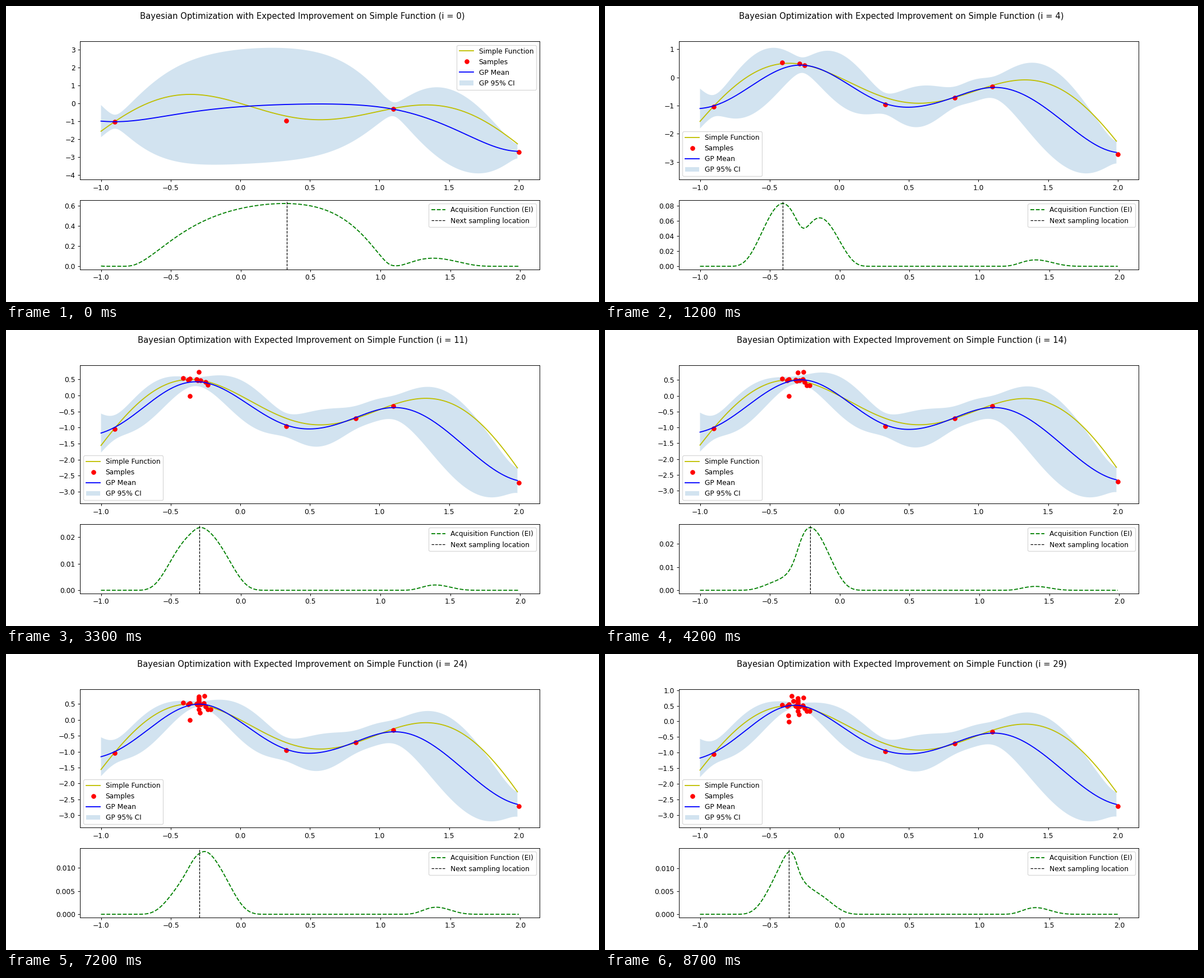
Write a matplotlib script that moves like this. It is 1058 px wide and 529 px high and loops after 9 s.

```python
import math

import matplotlib.pyplot as plt
import numpy as np
from matplotlib.animation import FuncAnimation

NOISE_VAR = 0.2 ** 2
XI = 0.01
STEPS = 30
START = 3  # samples known before the first step

GRID = np.arange(-1, 2, 0.01)

# Noisy samples (x, y) in the order they are taken
SAMPLES = np.array([
    (-0.9, -1.04), (1.1, -0.325), (2.0, -2.72),
    (0.33, -0.96), (0.83, -0.715), (-0.249, 0.425), (-0.284, 0.48),
    (-0.409, 0.535), (-0.373, 0.485), (-0.363, 0.52), (-0.363, -0.01),
    (-0.235, 0.335), (-0.314, 0.50), (-0.305, 0.475), (-0.298, 0.74),
    (-0.262, 0.515), (-0.258, 0.757), (-0.213, 0.325),
    (-0.290, 0.225), (-0.298, 0.335), (-0.302, 0.48), (-0.300, 0.50),
    (-0.297, 0.675), (-0.297, 0.645), (-0.298, 0.60), (-0.297, 0.56),
    (-0.296, 0.50), (-0.297, 0.48), (-0.308, 0.50), (-0.329, 0.65),
    (-0.341, 0.82), (-0.362, 0.55), (-0.366, 0.185),
])


def simple_function(x):
    return -np.sin(3 * x) - x ** 2 + 0.7 * x


def matern(a, b, length):
    r = math.sqrt(5) * np.abs(a[:, None] - b[None, :]) / length
    return (1 + r + r ** 2 / 3) * np.exp(-r)


def fit_kernel(x, y):
    """Length scale and signal variance of greatest marginal likelihood."""
    center = np.array([-0.3, 0.8])
    for width in (1.5, 0.25, 0.04, 0.006):
        offsets = np.linspace(-width, width, 17)
        variances = np.exp(center[1] + offsets)
        best = (np.inf, center)
        for log_length in center[0] + offsets:
            lam, vec = np.linalg.eigh(matern(x, x, math.exp(log_length)))
            spread = variances[:, None] * np.maximum(lam, 0) + NOISE_VAR
            cost = ((vec.T @ y) ** 2 / spread + np.log(spread)).sum(axis=1)
            k = cost.argmin()
            if cost[k] < best[0]:
                best = (cost[k], np.array([log_length, math.log(variances[k])]))
        center = best[1]
    return np.exp(center)


def posterior(x, y):
    length, var = fit_kernel(x, y)
    cov = var * matern(x, x, length) + NOISE_VAR * np.eye(len(x))
    cross = var * matern(GRID, x, length)
    weights = np.linalg.solve(cov, cross.T).T
    mean = weights @ y
    std = np.sqrt(np.maximum(var - (weights * cross).sum(axis=1), 1e-12))
    return mean, std


def expected_improvement(mean, std):
    gain = mean - mean.max() - XI
    z = gain / std
    cdf = 0.5 * (1 + np.array([math.erf(v / math.sqrt(2)) for v in z]))
    pdf = np.exp(-z ** 2 / 2) / math.sqrt(2 * math.pi)
    return gain * cdf + std * pdf


def run_step(i):
    known = SAMPLES[:START + i]
    mean, std = posterior(known[:, 0], known[:, 1])
    return mean, std, expected_improvement(mean, std)


results = [run_step(i) for i in range(STEPS)]

fig, (top, bottom) = plt.subplots(
    2, 1, figsize=(12, 6), dpi=1058 / 12,
    gridspec_kw={"height_ratios": [2, 1]})


def legend_corner():
    """Upper right while the curve passes below the legend there."""
    low, high = top.get_ylim()
    level = (simple_function(1.557) - low) / (high - low)
    return "upper right" if level < 0.66 else "lower left"


def draw(i):
    mean, std, ei = results[i]
    shown = SAMPLES[:START + i + 1]
    top.clear()
    bottom.clear()
    fig.suptitle("Bayesian Optimization with Expected Improvement "
                 f"on Simple Function (i = {i})")

    top.plot(GRID, simple_function(GRID), "y-", label="Simple Function")
    top.plot(shown[:, 0], shown[:, 1], "ro", label="Samples")
    top.plot(GRID, mean, "b-", label="GP Mean")
    top.fill_between(GRID, mean - 1.96 * std, mean + 1.96 * std,
                     alpha=0.2, label="GP 95% CI")
    top.legend(loc=legend_corner())

    bottom.plot(GRID, ei, "g--", label="Acquisition Function (EI)")
    bottom.axvline(shown[-1, 0], color="k", ls="--", lw=1,
                   label="Next sampling location")
    bottom.legend(loc="upper right")
    return []


anim = FuncAnimation(fig, draw, frames=STEPS, interval=300,
                     repeat=True, repeat_delay=0)
plt.show()
```
